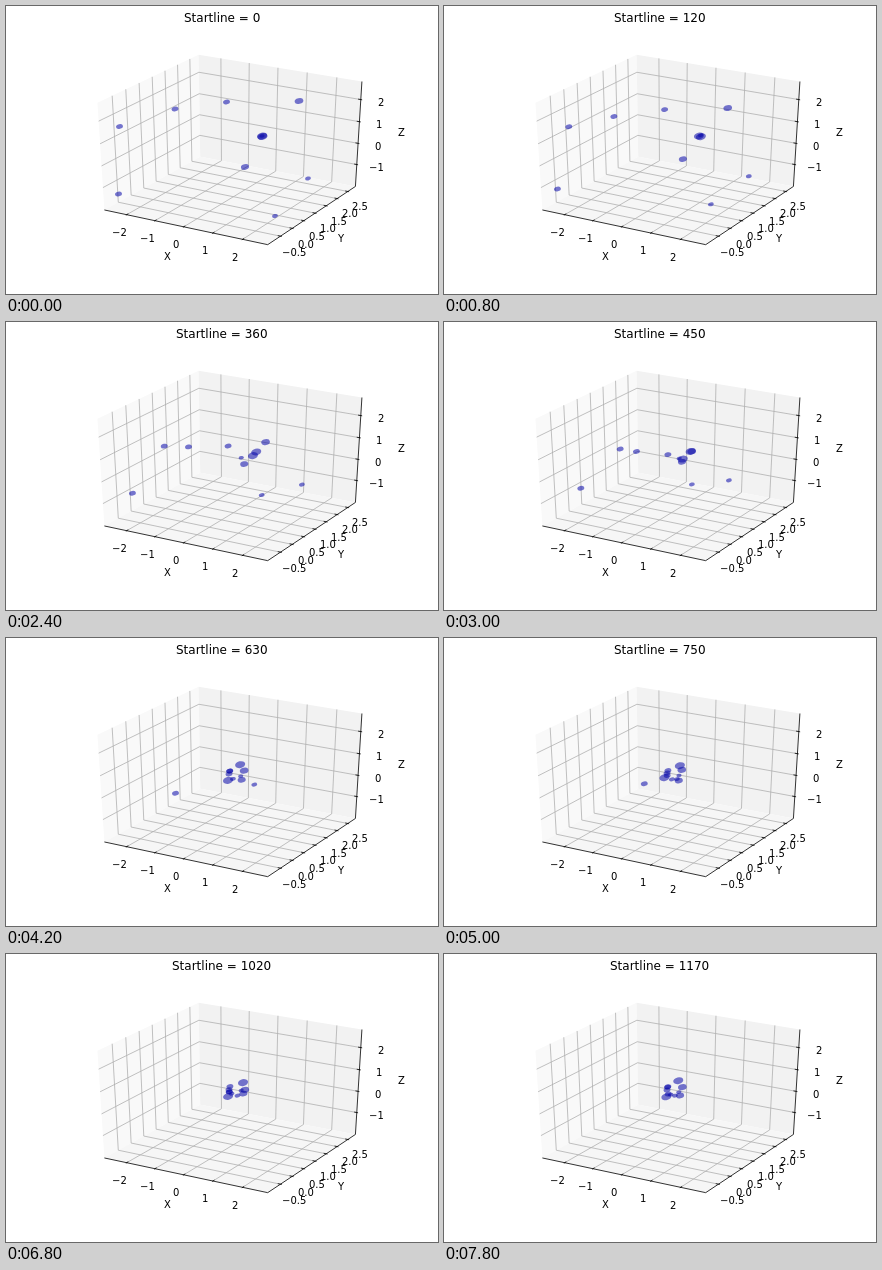
An HTML page with a canvas that plays this animation: 432x288 px, repeating every 8 s.

```html
<!DOCTYPE html>
<html lang="en">
<head>
<meta charset="utf-8">
<title>Startline</title>
<style>
html, body { margin: 0; width: 100%; height: 100%; overflow: hidden; background: #fff; }
canvas { display: block; width: 432px; height: 288px; }
</style>
</head>
<body>
<canvas id="stage" width="432" height="288"></canvas>
<script>
const ctx = document.getElementById('stage').getContext('2d');
const LOOP = 8000, STEP = 200, LINES = 30;
const H = 25 / 48;          // half side of the padded unit box
const DELTA = 1 / 12;
const FONT = '"DejaVu Sans", sans-serif';

// Camera: elevation 30 degrees, azimuth -60 degrees, distance 10.
const C = Math.cos(Math.PI / 6);
function project(x, y, z) {
  const d = 10 - (C / 2 * x - 0.75 * y + 0.5 * z);
  const u = (C * x + 0.5 * y) / d;
  const v = (-0.25 * x + C / 2 * y + C * z) / d;
  return [54 + (u + 0.095) / 0.185 * 334.8, 252 - (v + 0.095) / 0.185 * 217.44];
}

function trace(points) {
  ctx.beginPath();
  points.forEach(p => ctx.lineTo(...project(...p)));
}

function line(color, ...points) {
  trace(points);
  ctx.strokeStyle = color;
  ctx.lineWidth = 0.8;
  ctx.stroke();
}

function pane(color, ...points) {
  trace(points);
  ctx.closePath();
  ctx.fillStyle = color;
  ctx.fill();
}

function text(str, x, baseline, size) {
  ctx.font = size + 'px ' + FONT;
  ctx.fillStyle = '#000';
  ctx.fillText(str, Math.round(x - ctx.measureText(str).width / 2), Math.round(baseline));
}

const LABEL = H + DELTA, NAME = H + 2.173 * DELTA;
const T_OUT = H + 0.1 * DELTA, T_IN = H - 0.2 * DELTA;

// Ticks run from `from` to `to`; a value sits at zero + value * unit in the box.
const axes = [
  {
    name: 'X', from: -2, to: 2, by: 1, digits: 0, zero: -0.003, unit: 0.185,
    edge: [[-H, -H, -H], [H, -H, -H]],
    grid: a => [[a, -H, -H], [a, H, -H], [a, H, H]],
    tick: a => [[a, -T_OUT, -H], [a, -T_IN, -H]],
    label: (a, o) => [a, -o, -o]
  },
  {
    name: 'Y', from: -0.5, to: 2.5, by: 0.5, digits: 1, zero: -0.2452, unit: 0.2677,
    edge: [[H, -H, -H], [H, H, -H]],
    grid: a => [[H, a, -H], [-H, a, -H], [-H, a, H]],
    tick: a => [[T_OUT, a, -H], [T_IN, a, -H]],
    label: (a, o) => [o, a, -o]
  },
  {
    name: 'Z', from: -1, to: 2, by: 1, digits: 0, zero: -0.08, unit: 0.2145,
    edge: [[H, H, -H], [H, H, H]],
    grid: a => [[H, H, a], [-H, H, a], [-H, -H, a]],
    tick: a => [[T_OUT, H, a], [T_IN, H, a]],
    label: (a, o) => [o, o, a]
  }
];

function drawAxis(ax) {
  const values = [];
  for (let v = ax.from; v <= ax.to; v += ax.by) values.push(v);
  const place = v => ax.zero + v * ax.unit;
  values.forEach(v => line('#b0b0b0', ...ax.grid(place(v))));
  line('#000', ...ax.edge);
  for (const v of values) {
    line('#000', ...ax.tick(place(v)));
    const [x, y] = project(...ax.label(place(v), LABEL));
    text(v.toFixed(ax.digits).replace('-', '\u2212'), x, y + 8.25, 10);
  }
  const [x, y] = project(...ax.label(0, NAME));
  text(ax.name, x, y + 4.2, 10);
}

function drawBox() {
  pane('#f9f9f9', [-H, -H, -H], [-H, H, -H], [-H, H, H], [-H, -H, H]);
  pane('#f2f2f2', [-H, H, -H], [H, H, -H], [H, H, H], [-H, H, H]);
  pane('#f6f6f6', [-H, -H, -H], [H, -H, -H], [H, H, -H], [-H, H, -H]);
  axes.forEach(drawAxis);
}

// A body starts at x, y with drift vx, vy per step, then falls to its place
// in the cluster: at an angle around the centre, larger bodies further out.
const CENTRE = { x: 230, y: 136 };
const body = (r, x, y, vx, vy, angle, arrive = 21) => ({ r, x, y, vx, vy, angle, arrive });
const bodies = [
  body(3.5, 113.5, 120.5, 2.6, 0, -2.85),
  body(3.5, 169, 103, 0, 1.9, 2.9),
  body(3.5, 220.5, 96, 0, 1.8, -2.8, 15),
  body(4.4, 293, 95, -2.2, 1.7, -0.25, 17),
  body(5.1, 256, 130, -0.2, 0, -0.9),
  body(5.1, 256.5, 130.5, 0.3, 0, 2.6, 19),
  body(4.1, 239, 161, 0, -2.1, 0.7, 18),
  body(2.6, 256, 130, 1.2, -0.6, 0.2, 9),
  body(2.9, 302, 172.5, 1, -0.5, 1.2, 23),
  body(2.9, 269, 210, -0.4, -2.9, 2.2),
  body(3.5, 112.5, 188, 0, -1.2, 2.75, 27.5)
];

const fall = (from, drift, rest, arrive, u) =>
  from + drift * arrive * u + (rest - from - drift * arrive) * u ** 2.5;

function drawBody(b, i, k) {
  const u = Math.min(k / b.arrive, 1);
  const angle = b.angle + 0.25 * Math.sin(k / 3 + i);
  const x = fall(b.x, b.vx, CENTRE.x + 2 * b.r * Math.cos(angle), b.arrive, u);
  const y = fall(b.y, b.vy, CENTRE.y + 2 * b.r * Math.sin(angle), b.arrive, u);
  ctx.beginPath();
  ctx.ellipse(x, y, b.r, b.r * 0.667, -0.218, 0, 2 * Math.PI);
  ctx.fillStyle = 'rgba(8, 8, 170, 0.55)';
  ctx.fill();
}

function frame(now) {
  const k = Math.floor(now % LOOP / STEP);
  ctx.fillStyle = '#fff';
  ctx.fillRect(0, 0, 432, 288);
  drawBox();
  bodies.forEach((b, i) => drawBody(b, i, k));
  text('Startline = ' + k * LINES, 216, 16, 12);
  requestAnimationFrame(frame);
}
frame(performance.now());
</script>
</body>
</html>
```
